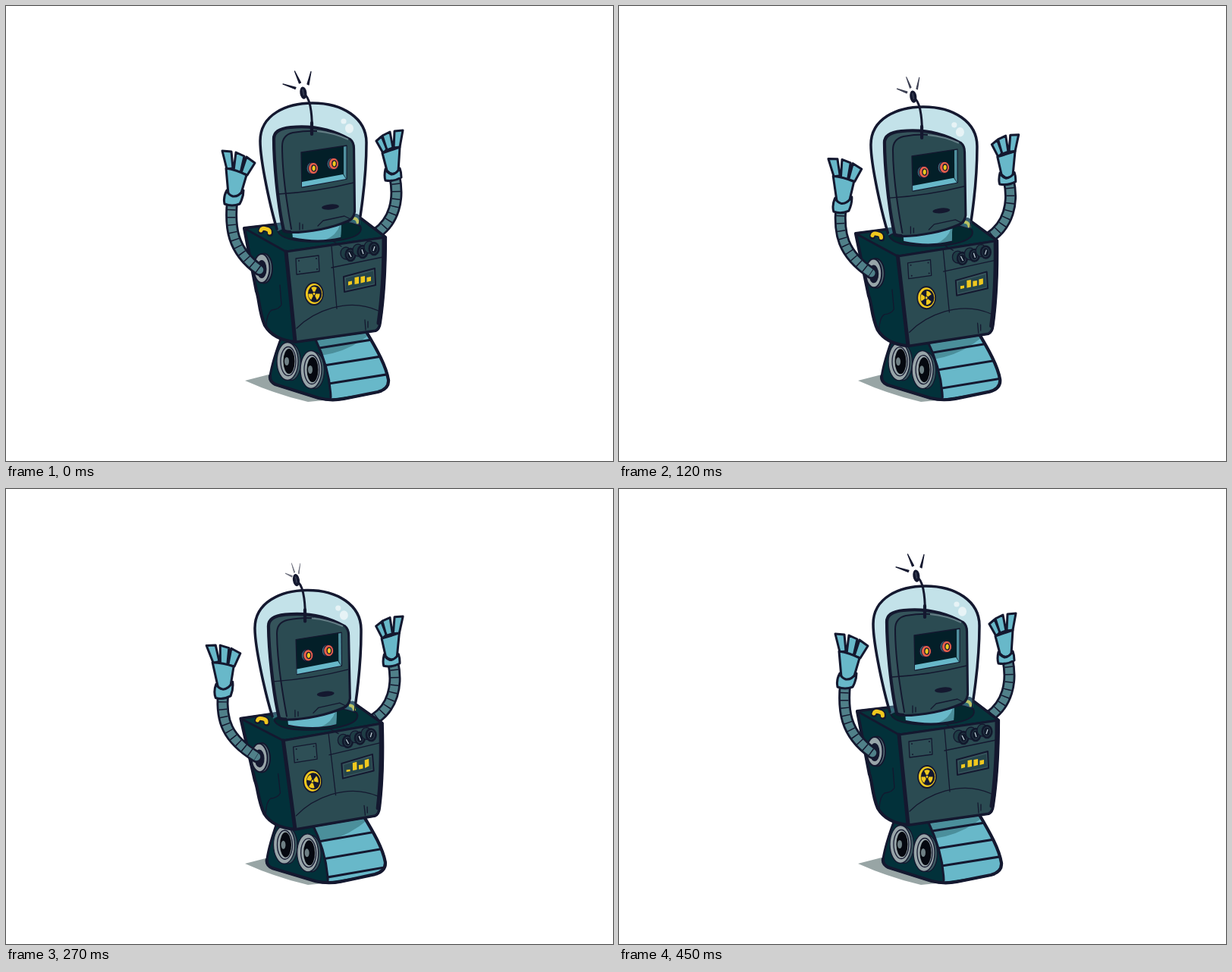
Recreate the animation shown at these times as an HTML page without scripts. Size 800x600 px, loop 480 ms.

```html
<!DOCTYPE html>
<html lang="en">
<head>
<meta charset="utf-8">
<title>Robot</title>
<style>
@property --drop { syntax: "<number>"; inherits: true; initial-value: 0; }
@property --sway { syntax: "<number>"; inherits: true; initial-value: 0; }
@property --roll { syntax: "<number>"; inherits: true; initial-value: 0; }

html, body { margin: 0; height: 100%; overflow: hidden; background: #fff; }
svg {
  display: block; width: 100%; height: 100%;
  animation: bob .48s steps(2) infinite, roll .48s steps(15) infinite;
}

@keyframes bob {
  0% { --drop: 0; --sway: 0; animation-timing-function: steps(3); }
  18.75% { --drop: .51; --sway: .3; }
  31.25% { --drop: .96; --sway: .57; }
  43.75% { --drop: 1.06; --sway: .84; }
  56.25% { --drop: .8; --sway: 1; }
  68.75% { --drop: .4; --sway: .65; }
  81.25% { --drop: .09; --sway: .3; }
  93.75%, 100% { --drop: 0; --sway: 0; }
}
@keyframes roll { 0% { --roll: 0; } 93.75%, 100% { --roll: 1; } }

.base {
  transform-origin: 425px 505px;
  transform: translateX(calc(var(--sway) * -4px)) rotate(calc(var(--sway) * -.8deg));
}
.treads { transform: translateY(calc(var(--roll) * 24px)); }
.cast { transform: translateY(calc(var(--drop) * 7px)); }
.body {
  transform-origin: 382px 445px;
  transform: translateY(calc(var(--drop) * 7.1px)) rotate(calc(var(--sway) * -1.75deg)) scaleY(calc(1 - var(--sway) * .013));
}
.head {
  transform-origin: 412px 295px;
  transform: translate(calc(var(--sway) * -6px), calc(var(--drop) * 6.7px)) rotate(calc(var(--sway) * -.5deg));
}
.antenna { transform: translateX(calc(var(--sway) * -1.8px)); }
.sparks {
  transform-origin: 392px 114px;
  transform: scale(calc(1 - var(--sway) * .47), calc(1 - var(--sway) * .23));
  opacity: calc(1 - var(--sway) * .4);
}
.hand-l {
  transform-origin: 300px 252px;
  transform: translate(calc(var(--sway) * -13px), calc(var(--drop) * 10px + var(--sway) * 5px)) rotate(calc(var(--sway) * -7.5deg));
}
.hand-r {
  transform-origin: 510px 222px;
  transform: translate(calc(var(--drop) * 7px - var(--sway) * 7.5px), calc(var(--drop) * 9.5px - var(--sway) * 4px)) rotate(calc(var(--drop) * 2.5deg));
}
.spin { transform: rotate(calc(var(--roll) * 120deg)); }
.bar {
  transform-box: fill-box; transform-origin: bottom;
  transform: scaleY(calc(1 + var(--sway) * var(--gain)));
}

.arm path { fill: none; animation: .48s infinite; }
.arm path:nth-child(1) { stroke: #14182f; stroke-width: 16; stroke-linecap: round; }
.arm path:nth-child(2) { stroke: #508089; stroke-width: 10.5; stroke-linecap: round; }
.arm path:nth-child(3) { stroke: #14182f; stroke-width: 11; stroke-dasharray: 1.5 8.5; }
.arm.l path { animation-name: arm-l; }
.arm.r path { animation-name: arm-r; }
@keyframes arm-l {
  0% { d: path("M298 258C295 290 297 322 334 348"); animation-timing-function: steps(5); }
  31.25% { d: path("M291 268C288 301 293 327 332 353"); animation-timing-function: steps(4); }
  56.25% { d: path("M286 270C283 305 291 329 330 353"); animation-timing-function: steps(6); }
  93.75%, 100% { d: path("M298 258C295 290 297 322 334 348"); }
}
@keyframes arm-r {
  0% { d: path("M512 224C519 256 511 284 488 300"); animation-timing-function: steps(5); }
  31.25% { d: path("M514 231C521 262 513 290 489 306"); animation-timing-function: steps(4); }
  56.25% { d: path("M510 228C517 260 509 288 486 303"); animation-timing-function: steps(6); }
  93.75%, 100% { d: path("M512 224C519 256 511 284 488 300"); }
}

.ink { stroke: #14182f; stroke-width: 3; stroke-linejoin: round; stroke-linecap: round; }
.thin { stroke-width: 1.3; }
.mid { stroke-width: 2; }
.bold { stroke-width: 4.2; }
.none { fill: none; }
.dark { fill: #14182f; }
.blue { fill: #68b8c9; }
.front { fill: #2b4b52; }
.side { fill: #02313a; }
.gray { fill: #98a5a9; }
.gold { fill: #f0c81e; }
</style>
</head>
<body>
<svg viewBox="0 0 800 600">
  <defs>
    <clipPath id="tread"><path d="M405 432C420 462 427 488 428 518L490 509Q505 505 504 493C501 475 490 455 474 428Z"/></clipPath>
    <g id="wheel">
      <ellipse cx="5" cy="1" rx="12.5" ry="24" fill="#3c5a61" class="ink thin"/>
      <ellipse rx="14" ry="25" class="gray ink thin"/>
      <ellipse cx="1" rx="10" ry="19" class="gray ink thin"/>
      <ellipse cx="2" rx="7.5" ry="16.5" fill="#050810"/>
      <ellipse cx="-1" rx="3" ry="5.5" fill="#6f8085"/>
    </g>
    <g id="eye">
      <ellipse cx="-2.5" rx="6.5" ry="7.8" fill="#3f7480" class="ink thin"/>
      <ellipse rx="6.5" ry="7.6" fill="#e9604d" class="ink" style="stroke-width:1"/>
      <ellipse cx=".6" rx="2.8" ry="4.1" class="gold ink thin"/>
    </g>
    <g id="knob">
      <ellipse cx="-6" cy="-2" rx="7" ry="8" fill="#1f3d45" class="ink thin"/>
      <ellipse rx="7" ry="8.5" fill="#101a2b" class="ink thin"/>
      <ellipse rx="4.5" ry="6" fill="none" stroke="#2b3b4c"/>
    </g>
  </defs>

  <path fill="#98a5a5" d="M315 494L350 485L440 518L398 522Q355 512 315 494Z"/>

  <g class="base">
    <path class="side ink" d="M364 434C356 455 350 475 348 488Q347 495 355 499L412 517Q428 521 445 518L490 509Q505 505 504 493C501 475 490 455 474 428Z"/>
    <g clip-path="url(#tread)">
      <path class="blue" d="M400 425H510V525H400Z"/>
      <path class="cast" fill="#4b8f9b" d="M400 425H490L470 440Q445 457 415 461Z"/>
      <path class="treads ink none" d="M400 429L520 410M400 453L520 434M400 477L520 458M400 502L520 483"/>
    </g>
    <path class="ink none" d="M408 440C420 465 427 488 428 516"/>
    <path class="ink none bold" d="M348 488Q347 495 355 499L412 517Q428 521 445 518L490 509Q505 505 504 493C501 475 490 455 474 428"/>
    <use href="#wheel" x="371" y="468.5"/>
    <use href="#wheel" x="402" y="479.5"/>
  </g>

  <g class="arm r"><path/><path/><path/></g>

  <g class="body">
    <path class="side ink bold" d="M314 293L462 276L500 305Q500 370 493 417Q492 426 487 428L381 443Q352 440 341 421C333 402 334 386 330 376Z"/>
    <path fill="#06353c" class="ink" d="M314 293L462 276L500 305L369 324Z"/>
    <path class="front ink" d="M369 324L500 305Q500 370 493 417Q492 426 487 428L381 443Z"/>
    <path class="ink none" style="stroke-width:5" d="M369 324L381 442M498 308Q498 370 491 418"/>
    <path class="ink none thin" d="M361 368L363 394Q360 400 350 401Q344 405 343 421M429 317L436 399M432 311L442 317M429 345L497 331M383 425C405 403 450 383 491 402M473 414L474 427M477 416V424"/>

    <path fill="#02292f" class="ink mid" d="M358 297C366 285 440 274 467 290C474 305 440 311 410 311C384 311 362 307 358 297Z"/>
    <path class="ink none" style="stroke-width:8" d="M336 297Q336 292 343 294Q349 295 348 300"/>
    <path fill="none" stroke="#f0c81e" stroke-width="5" stroke-linecap="round" d="M336 296Q337 292 343 294Q348 295 347.5 299"/>
    <path fill="none" stroke="#f0c81e" stroke-width="4" d="M457 280Q463 279 464 287"/>

    <path fill="#2e4f56" class="ink thin" d="M382 333L412 329L413 350L383 354Z"/>
    <path class="ink none mid" d="M386 336h0M409 333h0M387 350h0M410 347h0"/>

    <use href="#knob" x="454" y="328"/>
    <use href="#knob" x="470" y="324"/>
    <use href="#knob" x="485" y="320"/>
    <path stroke="#c5d3dc" stroke-width="1.2" d="M452 325L455 331M469 321L471 327M486 317L484 323"/>

    <path fill="#38565d" class="ink mid" d="M445 357L486 346L487 368L446 377Z"/>
    <path fill="#25444b" d="M448 359L484 349.5L485 366L448 374Z"/>
    <g class="gold">
      <path class="bar" style="--gain:-.45" d="M451 363.5L456 362.5V367L451 368.5Z"/>
      <path class="bar" style="--gain:.15" d="M459.5 358L465 357V366L459.5 367Z"/>
      <path class="bar" style="--gain:-.33" d="M467.5 357L473 356V364L467.5 365.5Z"/>
      <path class="bar" style="--gain:.75" d="M475.5 358L481 357V362.5L475.5 364Z"/>
    </g>

    <g transform="translate(406 379.5) scale(.82 1)">
      <circle r="14.5" class="gold ink mid"/>
      <circle cx="1.3" r="11.2" class="dark"/>
      <g class="spin">
        <circle r="6" fill="none" stroke="#f0c81e" stroke-width="6.5" pathLength="6" stroke-dasharray="1"/>
        <circle r="1.7" class="gold"/>
      </g>
    </g>

    <ellipse cx="340" cy="346" rx="11" ry="19.5" fill="#5b7279" class="ink mid"/>
    <ellipse cx="337" cy="346" rx="10.5" ry="19" class="gray ink mid"/>
    <ellipse cx="337" cy="347" rx="6.5" ry="12" class="dark"/>
  </g>

  <g class="head">
    <path class="blue" d="M376 285H442L441 306Q412 313 378 306Z"/>
    <path fill="#4b8f9b" d="M442 287L441 306Q432 309 420 309Q436 302 440 289Z"/>
    <path class="ink none mid" d="M378 306Q412 313 441 306"/>
    <path fill="#6db9ca" fill-opacity=".41" d="M358 297C349 270 335 205 335 178C335 143 370 128 404 128C444 128 475 148 475 180C475 210 471 255 466 289Q412 270 358 297Z"/>
    <path class="ink none" style="stroke-width:3.5" d="M357 294C349 268 335 205 335 178C335 143 370 128 404 128C444 128 475 148 475 180C475 210 471 250 467 277"/>
    <path class="ink none thin" d="M467 275L465 290"/>
    <g fill="#fff" fill-opacity=".6"><circle cx="445" cy="152" r="3.6"/><ellipse cx="452.5" cy="161.5" rx="5.5" ry="6.2"/></g>

    <path fill="#35545b" class="ink bold" d="M366 296C358 262 353 205 353 175Q353 162 375 160C405 157 432 164 453 176Q458 180 458 188L459 271Q458 280 451 283C430 292 400 298 376 298Q368 298 366 296Z"/>
    <path class="front" d="M376 297C370 260 364 215 364 185Q364 170 378 167C405 163 432 166 452 176Q457 180 457 188L458 271Q457 279 450 282C430 291 400 297 376 297Z"/>
    <path class="ink none mid" d="M376 294C370 260 364 215 364 185Q364 170 378 167C390 165 400 164 412 165"/>
    <path fill="none" stroke="#647d85" stroke-width="2" d="M410 165Q432 167 451 176"/>
    <path class="ink none thin" d="M359 248Q410 245 458 233M411 290L418 283L446 277L454 281M387 286V295M391 288V294"/>

    <path fill="#031f28" class="ink thin" d="M389 193L449 184V228L390 239Z"/>
    <path class="blue" d="M390 232L444 222L448 228L390 238.5Z"/>
    <path fill="#508f9d" d="M445 185.5L448.5 185V228L445 222Z"/>
    <use href="#eye" x="405" y="214"/>
    <use href="#eye" x="432" y="208"/>
    <ellipse cx="427.5" cy="265" rx="11.5" ry="3.5" class="dark" transform="rotate(-5 427.5 265)"/>

    <g class="antenna">
      <path class="ink none" d="M403 168C404 148 402 125 395 118"/>
      <path class="ink none bold" d="M403 169V154"/>
      <ellipse cx="391.8" cy="114.5" rx="4.5" ry="8.2" class="dark" transform="rotate(-8 392 114)"/>
      <path stroke="#4d5669" d="M391 110L392.5 118"/>
      <path class="sparks ink dark thin" d="M365 103L382 107.5L381 109.5ZM380.5 86L388.5 101L386.5 102ZM402 86.5L399 104L397 103Z"/>
    </g>
  </g>

  <g class="arm l"><path/><path/><path/></g>

  <g class="hand-l blue ink">
    <path d="M285 191L297 192L299 214L291 215ZM303 193L314 198L309 220L300 217ZM317 199L328 207L318 223L310 220Z"/>
    <path d="M290 214Q304 216 317 223L309 250Q300 256 293 248Z"/>
    <path d="M291 243Q286 252 288 261Q298 265 308 261Q313 252 313 243Q306 252 299 251Q293 249 291 243Z"/>
  </g>
  <g class="hand-r blue ink">
    <path d="M488 178L495 172L502 189L497 194ZM496 171L506 166L510 187L502 190ZM512 165L523 164L519 186L511 187Z"/>
    <path d="M496 194Q508 190 519 186L517 218Q509 225 502 217Z"/>
    <path d="M500 215Q498 224 500 230Q511 232 521 226Q521 219 519 214Q514 222 508 222Q502 220 500 215Z"/>
  </g>
</svg>
</body>
</html>
```
